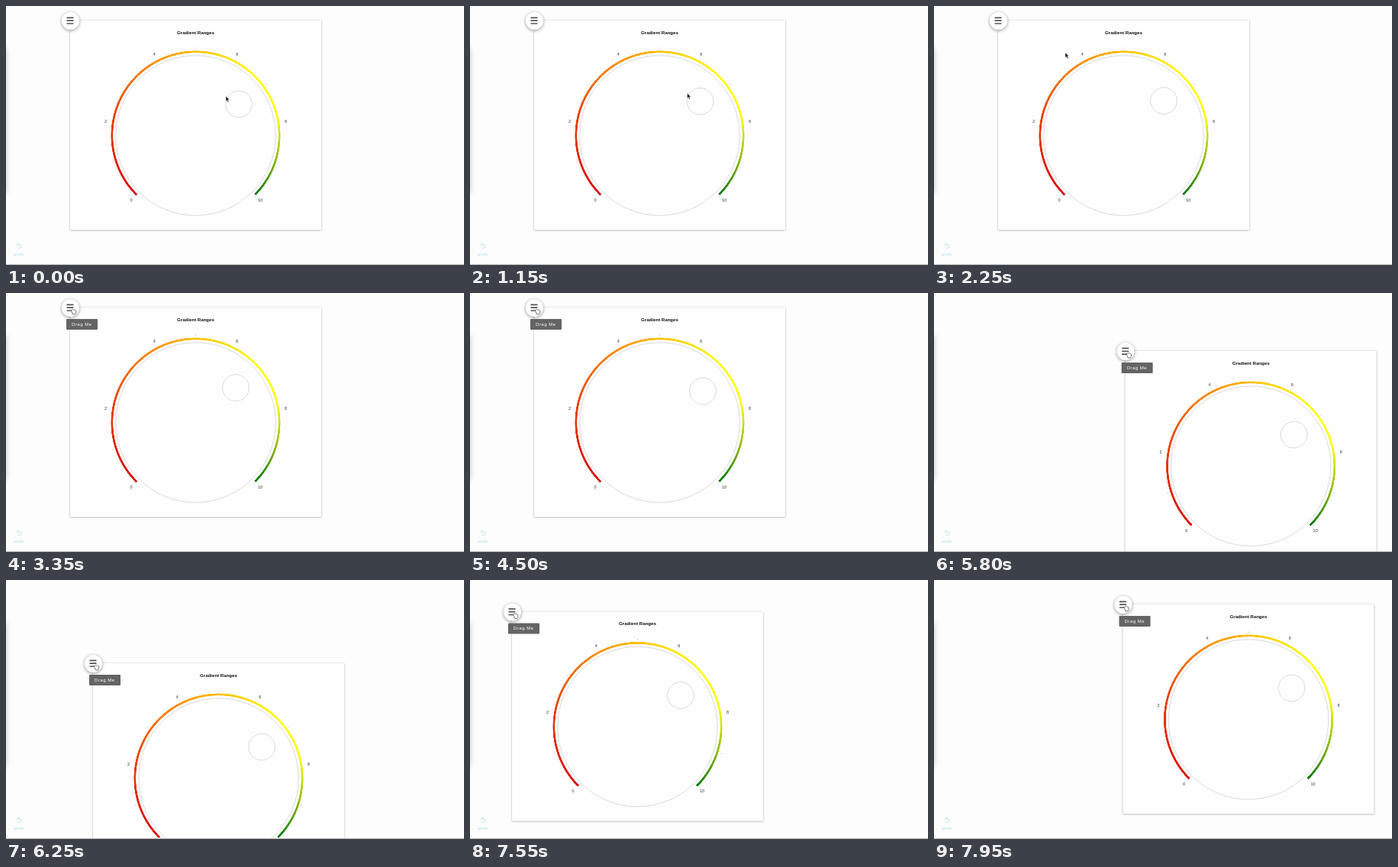
An HTML page that plays this animation: 600x339 px, repeating every 8 s.

```html
<!DOCTYPE html>
<html lang="en">
<head>
<meta charset="utf-8">
<style>
  html, body { margin: 0; width: 100%; height: 100%; overflow: hidden; background: #fdfdfd; }
  body { position: relative; font-family: "Liberation Sans", Arial, sans-serif; }
  div, svg { position: absolute; }
  svg { left: 0; top: 0; overflow: visible; }
  #drawer { left: -20px; top: 56px; width: 20px; height: 188px; box-shadow: 0 0 7px rgba(0,0,0,.25); }
  #footer { left: 0; bottom: 0; width: 100%; height: 1px; background: #b4b4b4; }
  #widget { left: 0; top: 0; width: 600px; height: 339px; }
  #card { left: 84px; top: 19px; width: 329px; height: 274px; background: #fefefe;
    border-radius: 1px; box-shadow: 0 .5px 2.5px rgba(0,0,0,.36); }
  #arc { left: 137.4px; top: 58.4px; width: 222.2px; height: 222.2px;
    background: conic-gradient(from 225deg, #df0800, #e83c08 54deg, #fb9208 108deg, #ffbe05 135deg,
      #fbe610 162deg, #ffff18 185deg, #fcfc10 212deg, #8cba08 243deg, #087808 270deg, transparent 270deg);
    -webkit-mask: radial-gradient(circle, transparent 108px, #000 108.5px, #000 110.8px, transparent 111.2px);
    mask: radial-gradient(circle, transparent 108px, #000 108.5px, #000 110.8px, transparent 111.2px); }
  #button { left: 72.5px; top: 7.5px; width: 23px; height: 23px; border-radius: 50%; background: #fff;
    box-shadow: 0 1px 4px rgba(0,0,0,.42); }
  #tip { left: 79px; top: 34.3px; width: 40.5px; height: 14px; border-radius: 1px; background: #646464;
    color: #fff; font-size: 6px; line-height: 14px; letter-spacing: .5px; text-align: center; }
  text { text-anchor: middle; }
</style>
</head>
<body>
<div id="drawer"></div>
<svg width="600" height="339">
  <g fill="none" stroke="#bcdeed" stroke-width=".9">
    <path d="M15 312.3h2.6a2.3 2.3 0 0 1 0 4.8h-2.2M16.2 310.6l-1.8 1.7 1.8 1.7"/>
  </g>
  <text x="16.7" y="326.8" font-size="6" letter-spacing=".3" fill="#b2d9ea">undo</text>
</svg>
<div id="widget">
  <div id="card"></div>
  <div id="arc"></div>
  <svg width="600" height="339">
    <text x="248.5" y="36.6" font-size="6.1" font-weight="bold" fill="#111">Gradient Ranges</text>
    <g fill="none" stroke="#dadada">
      <circle cx="248.5" cy="169.5" r="104.7"/>
      <circle id="knob" r="17.4"/>
    </g>
    <g id="scale" font-size="5.5" fill="#333" stroke-width=".8"></g>
  </svg>
  <div id="button"></div>
  <svg width="600" height="339">
    <path d="M79.5 15.4h9M79.5 19.2h9M79.5 23h9" stroke="#555" stroke-width="1.7"/>
  </svg>
  <div id="tip">Drag Me</div>
</div>
<svg width="600" height="339">
  <path id="arrow" d="M0 0v6.6l1.5-1.4 1.2 2.7 1.2-.5-1.2-2.7h2z" fill="#222" stroke="#fff" stroke-width=".3"/>
  <path id="hand" d="M-2.8 .2l-.6-2.2q.4-1 1.2-.4q.6-1 1.5-.2q.7-.7 1.4.1q1-.3 1.3.7q1 0 .9 1.2l-.3 2.2-1 1.8h-3z"
    fill="#fff" stroke="#555" stroke-width=".8"/>
</svg>
<div id="footer"></div>
<script>
const $ = id => document.getElementById(id);
const LOOP = 8000;

// Each key: time, x, y
const drag = [[4600, 0, 0], [5050, 241.5, 39], [5500, 241.5, 39], [6250, 30, 90],
  [6350, 30, 90], [7150, -29, 22.5], [7550, -29, 22.5], [7950, 163.5, 13]];
const pointer = [[0, 288, 118], [400, 288, 118], [1400, 284, 113.5], [1750, 284, 113.5],
  [2250, 172, 61], [2600, 89, 24.5]];
const knob = [[400, 305, 128.5], [1400, 301, 124], [3449, 301, 124], [3450, 305, 128.5]];

const clamp = v => Math.min(1, Math.max(0, v));

function at(keys, t) {
  let i = 0;
  while (i < keys.length - 2 && t >= keys[i + 1][0]) i++;
  const [t0, x0, y0] = keys[i], [t1, x1, y1] = keys[i + 1];
  const p = clamp((t - t0) / (t1 - t0)), e = p * p * (3 - 2 * p);
  return [x0 + (x1 - x0) * e, y0 + (y1 - y0) * e];
}

function buildScale() {
  let marks = '';
  for (let v = 0; v <= 10; v++) {
    const a = (135 + v * 27) * Math.PI / 180;
    const polar = r => [248.5 + r * Math.cos(a), 169.5 + r * Math.sin(a)];
    const [x, y] = polar(119.5);
    marks += `<path d="M${polar(113.6)}L${polar(114.9)}" stroke="${v % 2 ? '#aaa' : '#ddd'}"/>`;
    if (v % 2 === 0) marks += `<text x="${x}" y="${y + 2}">${v}</text>`;
  }
  $('scale').innerHTML = marks;
}

const move = (el, [x, y]) => el.setAttribute('transform', `translate(${x} ${y})`);

function draw(now) {
  const t = now % LOOP;
  const [dx, dy] = at(drag, t), [px, py] = at(pointer, t);
  const hovering = t >= 2600;
  $('widget').style.transform = `translate(${dx}px, ${dy}px)`;
  $('tip').style.opacity = clamp((t - 2700) / 200);
  $('arrow').style.display = hovering ? 'none' : '';
  $('hand').style.display = hovering ? '' : 'none';
  move($(hovering ? 'hand' : 'arrow'), [px + dx, py + dy]);
  move($('knob'), at(knob, t));
  requestAnimationFrame(draw);
}

buildScale();
requestAnimationFrame(draw);
</script>
</body>
</html>
```
